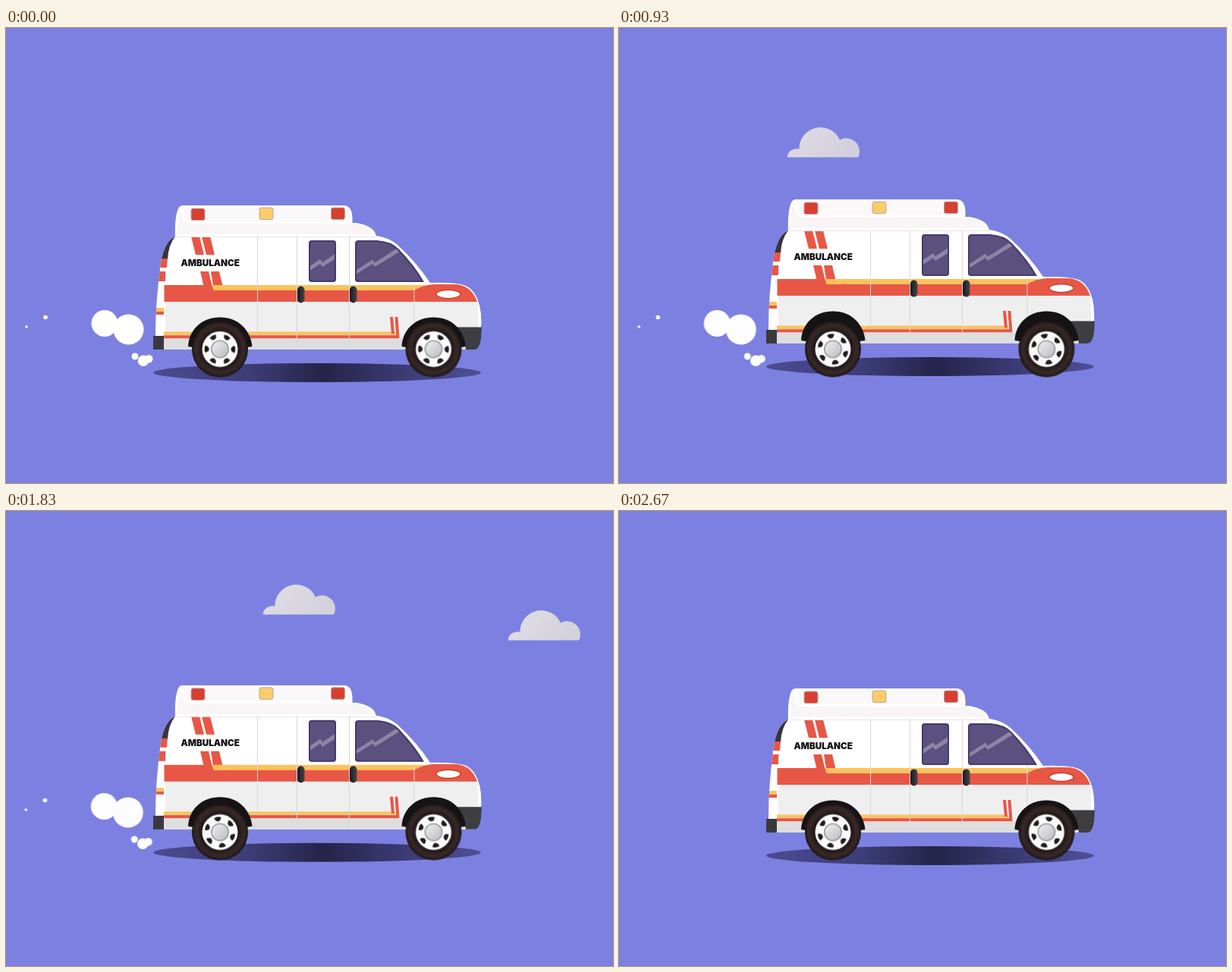
These frames come from a looping animation (800x600 px, 2.7 s). An HTML page:

```html
<!DOCTYPE html>
<html lang="en">
<head>
<meta charset="utf-8">
<title>Ambulance</title>
<style>
html, body { margin: 0; width: 100%; height: 100%; overflow: hidden; background: #7c81e1; }
svg { display: block; width: 100%; height: 100%; }
.clouds { animation: drift 2700ms linear infinite; }
.puffs { animation: puff 450ms linear infinite; }
.bounce { animation: bounce 540ms cubic-bezier(.36, 0, .64, 1) infinite; }
.spin { transform-origin: 0 0; animation: spin 540ms linear infinite; }
.label { font: 900 11.7px Inter, "Liberation Sans", sans-serif; fill: #111; }
.red { fill: #e85745; }
.yellow { fill: #fbc25c; }

/* Two passes, each leaving the stage before the jump back */
@keyframes drift {
  0% { transform: translateX(895px); opacity: .8; }
  20% { transform: translateX(301px); opacity: .95; }
  22.222% { transform: translateX(235px); opacity: 1; }
  34.444% { transform: translateX(-100px); opacity: .93; }
  49.03% { transform: translateX(-497px); opacity: .8; }
  49.04% { transform: translateX(895px); opacity: .8; }
  67.778% { transform: translateX(340px); opacity: .95; }
  75.556% { transform: translateX(115px); opacity: 1; }
  98.07%, 100% { transform: translateX(-500px); opacity: .8; }
}
@keyframes puff {
  0%, 5.4% { transform: none; opacity: 1; }
  73.333% { transform: translateX(-34px); opacity: .3; }
  90%, 100% { transform: translateX(-42px); opacity: 0; }
}
@keyframes bounce {
  0%, 5.5% { transform: none; }
  71% { transform: translateY(-8px); }
  96%, 100% { transform: none; }
}
@keyframes spin { to { transform: rotate(360deg); } }
</style>
</head>
<body>
<svg viewBox="0 0 800 600" preserveAspectRatio="none">
  <defs>
    <linearGradient id="shade">
      <stop offset="0" stop-color="#4b4b92"/>
      <stop offset=".3" stop-color="#3c3c76"/>
      <stop offset=".52" stop-color="#242449"/>
      <stop offset=".75" stop-color="#3a3a72"/>
      <stop offset="1" stop-color="#4f4f98"/>
    </linearGradient>
    <linearGradient id="mist" x1="0" y1="0" x2="1" y2=".35">
      <stop offset="0" stop-color="#e7e4e6"/>
      <stop offset="1" stop-color="#dad6dc"/>
    </linearGradient>
    <linearGradient id="steel" x1="0" y1="0" x2="1" y2="1">
      <stop offset="0" stop-color="#f1f1f3"/>
      <stop offset="1" stop-color="#b9babf"/>
    </linearGradient>
    <linearGradient id="rubber">
      <stop offset="0" stop-color="#18191c"/>
      <stop offset="1" stop-color="#45464b"/>
    </linearGradient>
    <radialGradient id="tyre">
      <stop offset=".66" stop-color="#251a1a"/>
      <stop offset=".88" stop-color="#352827"/>
      <stop offset="1" stop-color="#1c1414"/>
    </radialGradient>

    <path id="shell" d="M223 275 L478 273 Q502 274 516 286 Q541 309 559 336 Q592 335 606 340 Q619 346 624 366 Q627 380 626 396 L618 424 H208 L197 406 Q197 360 204 310 Q209 281 223 275Z"/>
    <path id="cab" d="M465 280 H488 Q508 281 518 292 Q539 314 551 335 H464 Q460 335 460 331 V285 Q460 280 465 280Z"/>
    <rect id="pane" x="399" y="280" width="36" height="55" rx="4"/>
    <clipPath id="inShell"><use href="#shell"/></clipPath>
    <clipPath id="inCab"><use href="#cab"/></clipPath>
    <clipPath id="inPane"><use href="#pane"/></clipPath>

    <path id="cloud" d="M0 0 C0 -8 7 -12 15.5 -11 A28 28 0 0 1 69 -23 A17.5 17.5 0 0 1 93.200 0Z" fill="url(#mist)"/>
    <path id="arch" d="M-42 -4 C-41 -27 -23 -42.500 0 -42.500 C23 -42.500 40 -27 42.500 -4 L36 -3 H-36Z" fill="#151314"/>
    <rect id="handle" width="9.500" height="22" rx="4.700" fill="url(#rubber)"/>
    <rect id="lamp" width="18" height="15.500" rx="2.500" stroke="#b9a9a4"/>

    <path id="hole" d="M-4 -19.600 Q0 -21.200 4 -19.600 Q5 -18.800 4.200 -17.600 L2.300 -15 Q0 -13.800 -2.300 -15 L-4.200 -17.600 Q-5 -18.800 -4 -19.600Z"/>
    <g id="pair"><use href="#hole"/><use href="#hole" transform="rotate(180)"/></g>
    <g id="holes" fill="#231b1c">
      <use href="#pair" transform="rotate(30)"/>
      <use href="#pair" transform="rotate(90)"/>
      <use href="#pair" transform="rotate(150)"/>
    </g>
    <g id="tread">
      <circle r="37" fill="url(#tyre)"/>
      <circle r="30" fill="none" stroke="#40302f" stroke-width=".8"/>
      <circle r="23.500" fill="#fafafb"/>
    </g>
    <circle id="hub" r="11.200" fill="url(#steel)" stroke="#8f9097" stroke-width="1.300"/>
  </defs>

  <rect width="800" height="600" fill="#7c81e1"/>

  <g class="clouds">
    <use href="#cloud" y="136.500"/>
    <use href="#cloud" x="323" y="170.500"/>
  </g>

  <g class="puffs" fill="#fff">
    <circle cx="130" cy="389.500" r="17.500"/>
    <circle cx="161.500" cy="397.500" r="20"/>
    <circle cx="52" cy="381.500" r="2.800"/>
    <circle cx="27" cy="394" r="1.800"/>
    <circle cx="170" cy="433" r="4.500"/>
    <circle cx="181" cy="438.800" r="7.200"/>
    <circle cx="188.300" cy="436.200" r="5.200"/>
  </g>

  <g class="bounce">
    <ellipse cx="410" cy="454.500" rx="216" ry="12.500" fill="url(#shade)"/>

    <!-- Roof -->
    <path d="M223 276 Q222 250 227 238 Q229 234 233 234 H446 Q456 235 456.500 250 V257 H462 Q486 261 488 275Z" fill="#fff"/>
    <path d="M232 237 Q228 250 238 258 H456 Q476 260 484 272 H226 Q225 250 232 237Z" fill="#f9f5f6"/>
    <path d="M236 237 H446 Q453 238 453 250 V255 H238 Q233 247 236 237Z" fill="#fbf8f9"/>
    <use href="#lamp" x="244" y="238" fill="#d83f31"/>
    <use href="#lamp" x="334" y="237" fill="#fdcb6a"/>
    <use href="#lamp" x="428.500" y="237" fill="#d83f31"/>

    <!-- Body panels -->
    <use href="#shell" fill="#fff"/>
    <g clip-path="url(#inShell)">
      <rect x="210" y="360" width="412" height="49" fill="#efeff0"/>
      <rect x="208" y="409" width="414" height="16" fill="#dededf"/>
      <path d="M223 275 Q209 280 204 305 H213 Q214 286 223 275Z" fill="#35353a"/>
      <path class="red" d="M200 304 H213 L212 316 H200Z M200 321 H210.500 L210 334 H200Z M195 374 H208 V378 H195Z"/>
      <path class="yellow" d="M195 369 H208 V374 H195Z"/>
      <path class="yellow" d="M271 339 H554 L538 347 H273Z"/>
      <path class="red" d="M208.500 339 H271 L274 346 H538 Q550 338.500 564 338 H590 Q613 338 621 361 H208.500Z"/>
      <path class="red" d="M244 275 H255 L261 299 H250Z M258 275 H269 L275 299 H264Z"/>
      <path class="red" d="M256 321 H267 L273 346 H262Z M270 321 H281 L287 346 H274Z"/>
      <path class="yellow" d="M271.500 339 H290 V346 H273.500Z"/>
      <rect class="yellow" x="208" y="400.500" width="305" height="4.300"/>
      <rect class="red" x="208" y="405.200" width="310" height="4"/>
      <path class="red" d="M506 381 H510 L512 403 H508Z M512.500 381 H516.500 L518.500 409 H514.500Z"/>
      <path d="M331.500 274 V400 M383.500 274 V424 M452.500 274 V424 M538 335 V388" fill="none" stroke="#d9d6d8"/>
      <path d="M224 275.500 H488" stroke="#e9e4e6"/>
      <path d="M626 362 V395" stroke="#fff" stroke-width="5"/>
    </g>
    <text class="label" x="230.500" y="314">AMBULANCE</text>

    <!-- Glass: borders are clipped to lie inside the edge -->
    <g clip-path="url(#inPane)">
      <use href="#pane" fill="#5c507f"/>
      <path d="M396 317 L414 305 L417 309 L438 295 V302 L417 315 L414 311 L396 323Z" fill="#8d84a6"/>
      <use href="#pane" fill="none" stroke="#443a70" stroke-width="4"/>
    </g>
    <g clip-path="url(#inCab)">
      <use href="#cab" fill="#5c507f"/>
      <path d="M456 323 L483 305.500 L486 309.500 L518 289 L522 293 L486 315 L483 311 L456 328Z" fill="#8d84a6"/>
      <use href="#cab" fill="none" stroke="#443a70" stroke-width="4"/>
    </g>

    <use href="#handle" x="384" y="340.500"/>
    <use href="#handle" x="453" y="340.500"/>
    <ellipse cx="583" cy="351" rx="16" ry="5.600" fill="#fff" stroke="#c63a2c" stroke-width="1.400"/>

    <!-- Bumpers and wheel arches -->
    <path d="M194 406 H208 V424 H194Z" fill="#39393e"/>
    <path d="M594 394.500 H627 L626 410 Q624 423 618 424 H606 Q605 405 594 394.500Z" fill="#3d3d42"/>
    <use href="#arch" x="282" y="424"/>
    <use href="#arch" x="563.500" y="424"/>
  </g>

  <g transform="translate(282 423.500)">
    <use href="#tread"/>
    <g class="spin"><use href="#holes"/></g>
    <use href="#hub"/>
  </g>
  <g transform="translate(563.500 423.500)">
    <use href="#tread"/>
    <g class="spin"><use href="#holes"/></g>
    <use href="#hub"/>
  </g>
</svg>
</body>
</html>
```
